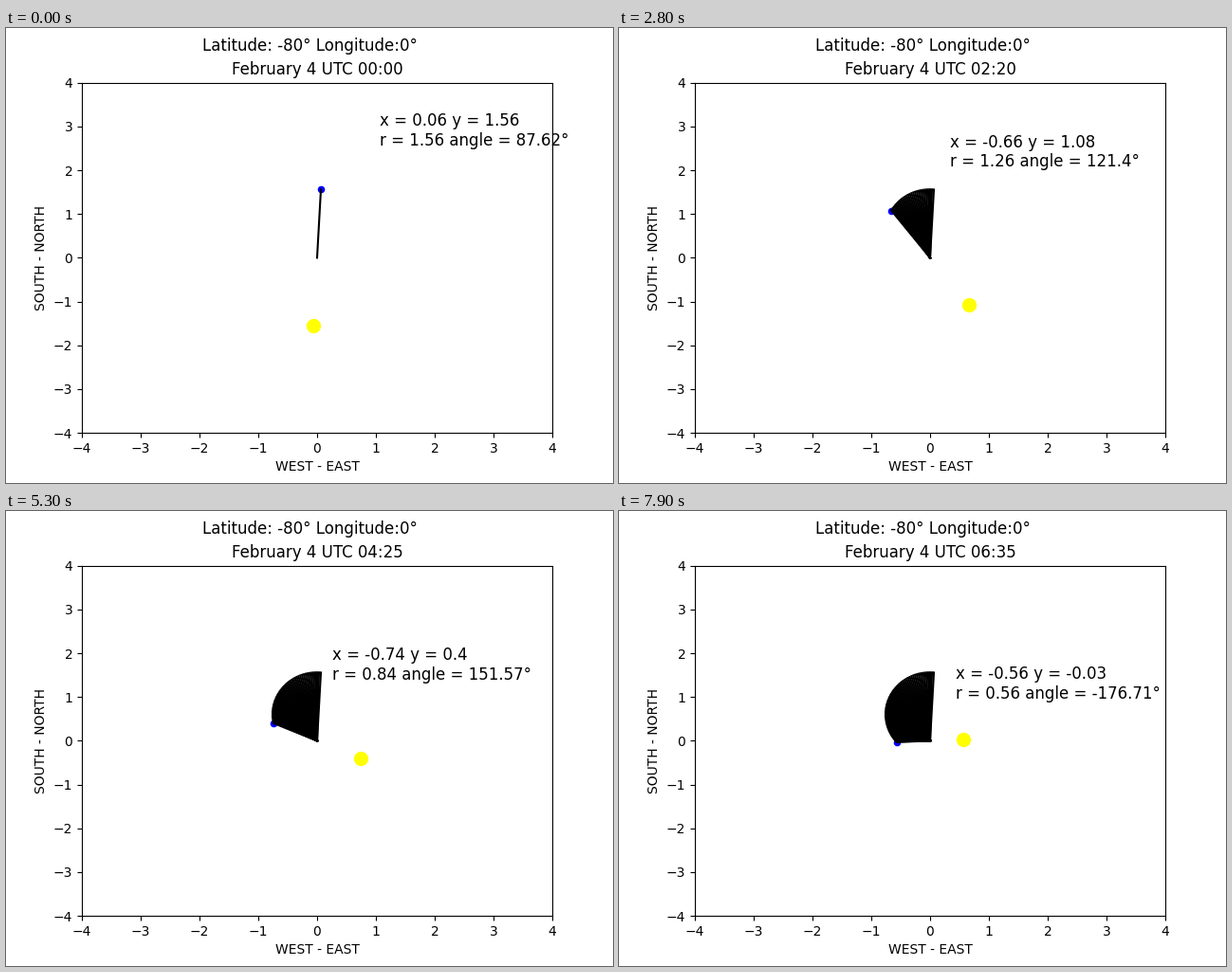
A matplotlib script that plays this animation: 640 px wide and 480 px high, repeating every 8000 ms.

```python
import numpy as np
import matplotlib.pyplot as plt
from matplotlib.animation import FuncAnimation

FRAMES, INTERVAL = 80, 100
STEP_MIN = 5
LAT = np.radians(-80)
GNOMON = 0.17375


def shadow_tip(minutes):
    """Shadow tip (east, north) of a vertical gnomon."""
    dec = np.radians(-16.35 + 0.0123 * minutes / 60)
    hour = np.radians(minutes / 4 - 2.463 - 180)
    east = -np.cos(dec) * np.sin(hour)
    north = np.sin(dec) * np.cos(LAT) - np.cos(dec) * np.cos(hour) * np.sin(LAT)
    up = np.sin(dec) * np.sin(LAT) + np.cos(dec) * np.cos(hour) * np.cos(LAT)
    return -GNOMON * east / up, -GNOMON * north / up


def readout(x, y):
    r, angle = np.hypot(x, y), np.degrees(np.arctan2(y, x))
    return (f"x = {round(float(x), 2)} y = {round(float(y), 2)}\n"
            f"r = {round(float(r), 2)} angle = {round(float(angle), 2)}°")


tips = [shadow_tip(i * STEP_MIN) for i in range(FRAMES)]

fig, ax = plt.subplots(figsize=(6.4, 4.8), dpi=100)
fig.suptitle("Latitude: -80° Longitude:0°")
title = ax.set_title("")
ax.set(xlim=(-4, 4), ylim=(-4, 4), xlabel="WEST - EAST", ylabel="SOUTH - NORTH")

sun = ax.scatter([0], [0], s=100, c="yellow")
tip = ax.scatter([0], [0], s=20, c="blue")
rays = [ax.plot([0, x], [0, y], color="black")[0] for x, y in tips]
label = ax.text(0, 0, "", fontsize=12)


def update(i):
    x, y = tips[i]
    hours, mins = divmod(i * STEP_MIN, 60)
    title.set_text(f"February 4 UTC {hours:02d}:{mins:02d}")
    sun.set_offsets([[-x, -y]])
    tip.set_offsets([[x, y]])
    for n, ray in enumerate(rays):
        ray.set_visible(n <= i)
    label.set_position((x + 1, y + 1))
    label.set_text(readout(x, y))
    return [title, sun, tip, label, *rays]


anim = FuncAnimation(fig, update, frames=FRAMES, interval=INTERVAL,
                     repeat=True, repeat_delay=0, blit=False)
plt.show()
```
